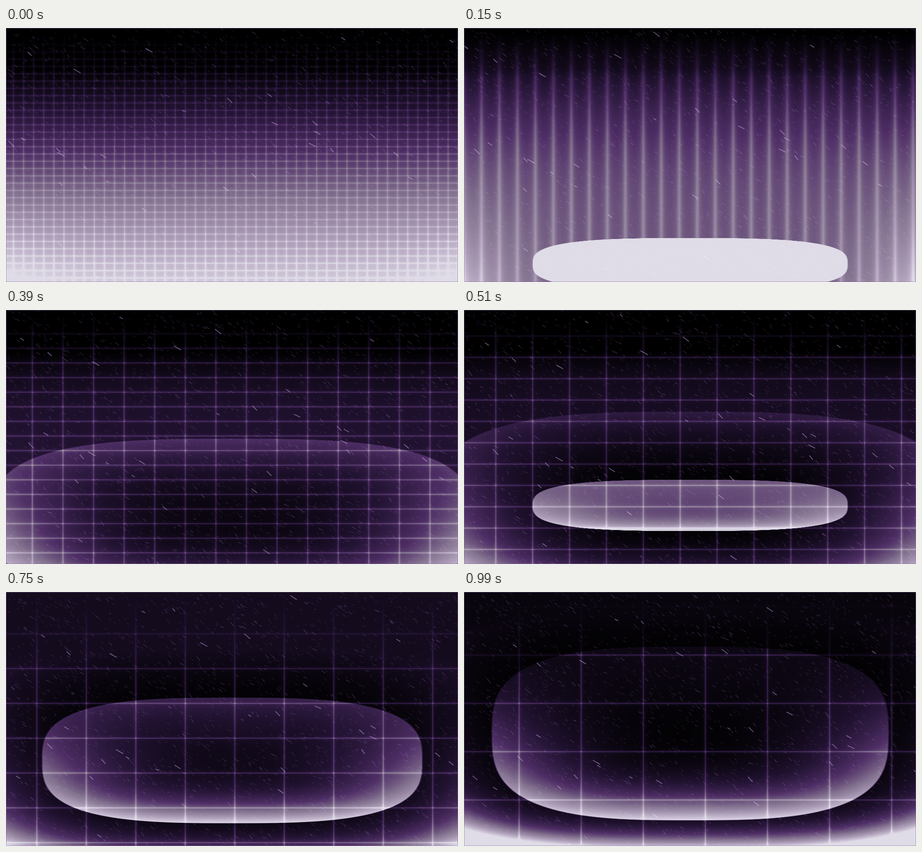
Write an HTML page with a canvas that moves like this. It is 997x561 px and loops after 1.02 s.

```html
<!DOCTYPE html>
<html>
<head>
<meta charset="utf-8">
<style>
  html, body { margin: 0; width: 100%; height: 100%; overflow: hidden; background: #000; }
  canvas { display: block; }
</style>
</head>
<body>
<canvas id="stage" width="997" height="561"></canvas>
<script>
const W = 997, H = 561, LOOP = 1020, STEP = 30, ROUND = 3;
const ctx = document.getElementById('stage').getContext('2d');
const image = ctx.createImageData(W, H);
const pixels = new Uint32Array(image.data.buffer);
const { abs, exp, max, min } = Math;
const clamp = v => max(0, min(1, v));
const lerp = (a, b, k) => a + (b - a) * k;
const axis = (n, f) => Float32Array.from({ length: n }, (_, i) => f(i));

// Brightness to colour, through a few key shades
const shades = [[0, 0, 0, 0], [.2, 34, 19, 50], [.4, 79, 47, 102],
  [.6, 133, 116, 145], [.8, 179, 164, 190], [1, 224, 220, 232]];
const palette = Uint32Array.from({ length: 512 }, (_, i) => {
  const u = i / 512 * 5, k = u | 0;
  const [r, g, b] = [1, 2, 3].map(c => lerp(shades[k][c], shades[k + 1][c], u - k));
  return (255 << 24 | b << 16 | g << 8 | r) >>> 0;
});

// Two growing rings; every property follows from the age s in ms
const rings = [
  {
    born: 85,
    a: s => 560 * s / (s + 42) + .13 * s,
    b: s => 230 * (1 - exp(-s / 240)) + .04 * s,
    core: s => 1.25 * exp(-((s / 175) ** 2)),
    top: s => 1.1 * exp(-s / 300),
    bottom: s => 1 + s / 3500,
    power: s => 2 + (s / 430) ** 2,
    ramp: s => 100 + max(0, s - 425) * .4
  },
  {
    born: 390,
    a: s => 470 * s / (s + 41.6),
    b: s => 290 * (1 - exp(-s / 550)),
    core: s => exp(-s / 155),
    top: s => .62 - s / 1100,
    bottom: () => 1,
    power: () => 2.3,
    ramp: () => 70
  }
];

const gridAmp = (y, ramp) => clamp((y - 10) / ramp);

// Glow of the evenly spaced lines through one fixed anchor
function gridLines(n, anchor, cell, width, gain) {
  const sharp = clamp(abs(cell) / 8);
  return axis(n, i => {
    const u = (i - anchor) / cell, d = (u - Math.round(u)) * cell / width;
    return gain * lerp(.6, 1 / (1 + d * d), sharp);
  });
}

function shapeRing(ring, t) {
  const s = t - ring.born, a = ring.a(s), b = ring.b(s), cy = 557.5 - .248 * t;
  const top = ring.top(s), bottom = ring.bottom(s);
  const power = ring.power(s) / ROUND, ramp = ring.ramp(s);
  return {
    core: min(1, ring.core(s)),
    filled: s > 640 ? 1 : 0, // an old ring covers the whole stage
    qx: axis(W, x => abs((x - 498.5) / a) ** ROUND),
    qy: axis(H, y => abs((y - cy) / b) ** ROUND),
    edge: axis(H, y => lerp(top, bottom, clamp((y - cy) / b / 2 + .5) ** 1.6)),
    amp: axis(H, y => gridAmp(y, ramp)),
    curve: axis(1025, i => (i / 1024) ** power)
  };
}

function drawField(t) {
  const cellX = 22.3 + .1158 * t, cellY = -16.1 + .124 * t;
  const gain = .25 * (1 - .45 * exp(-t / 250));
  const gx = gridLines(W, 395, cellX, 1.4 + 3.6 * clamp(1 - abs(cellY) / 16), gain);
  const gy = gridLines(H, 245.5, cellY, 1.2, gain);
  const live = rings.filter(r => t > r.born).map(r => shapeRing(r, t));
  const cap = .5 * exp(-t / 400) + 2 * exp(-t / 40);
  const corner = .9 * exp(-t / 170) * (1 - exp(-t / 60)) + .1 * exp(-t / 60);
  const side = axis(W, x => corner * ((x - 498.5) / 498.5) ** 4);
  for (let y = 0, p = 0; y < H; y++) {
    const base = cap * Math.tanh(max(0, y - 90) / 480 / cap);
    const low = (y / H) ** 3, baseAmp = gridAmp(y, 100);
    for (let x = 0; x < W; x++, p++) {
      let v = base + side[x] * low, amp = baseAmp;
      for (const r of live) {
        const q = r.qx[x] + r.qy[y];
        if (q >= 1 && !r.filled) continue;
        const cover = r.filled || min(1, (1 - q) * 40);
        const inner = r.core + (r.edge[y] - r.core) * r.curve[min(1, q) * 1024 | 0];
        v += (inner - v) * cover;
        amp += (r.amp[y] - amp) * cover;
      }
      v += amp * (gx[x] + gy[y]);
      pixels[p] = palette[v >= 1 ? 511 : v * 511 | 0];
    }
  }
  ctx.putImageData(image, 0, 0);
}

// Slanted rain in three weights
let seed = 7;
const rnd = () => (seed = seed * 16807 % 2147483647) / 2147483647;
const rain = [
  { count: 1900, size: 8, width: 1, color: 'rgba(92,62,120,.42)' },
  { count: 260, size: 10, width: 1.1, color: 'rgba(112,82,140,.5)' },
  { count: 32, size: 15, width: 1.8, color: 'rgba(150,122,176,.65)' }
];
for (const s of rain) {
  s.drops = Array.from({ length: s.count }, () => ({
    x: rnd() * W, y: rnd() * H, angle: .4 + rnd() * .55,
    size: s.size * (.5 + rnd() * .7), speed: .12 + rnd() * .14
  }));
}

function drawRain(t) {
  ctx.globalCompositeOperation = 'screen';
  for (const s of rain) {
    ctx.beginPath();
    for (const d of s.drops) {
      const dx = Math.cos(d.angle), dy = Math.sin(d.angle);
      const x = (d.x + dx * d.speed * t) % W, y = (d.y + dy * d.speed * t) % H;
      ctx.moveTo(x, y);
      ctx.lineTo(x + dx * d.size, y + dy * d.size);
    }
    ctx.lineWidth = s.width;
    ctx.strokeStyle = s.color;
    ctx.stroke();
  }
  ctx.globalCompositeOperation = 'source-over';
  ctx.lineWidth = 1;
  ctx.strokeStyle = 'rgba(140,112,165,.6)';
  ctx.strokeRect(.5, .5, W - 1, H - 1);
}

let shown = -1;
function frame() {
  const t = Math.floor(performance.now() % LOOP / STEP) * STEP;
  if (t !== shown) {
    shown = t;
    drawField(t);
    drawRain(t);
  }
  requestAnimationFrame(frame);
}
frame();
</script>
</body>
</html>
```
